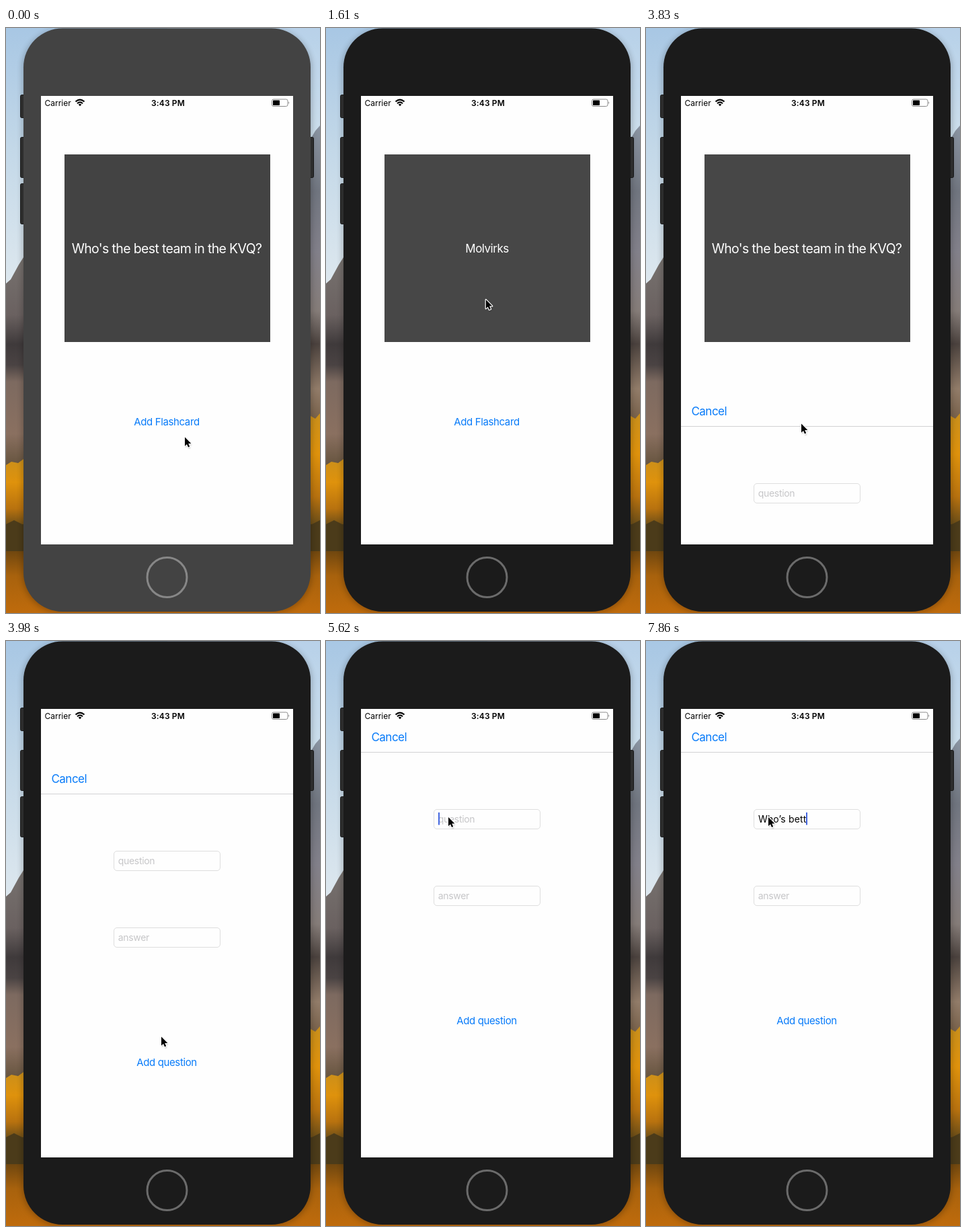
Recreate the animation shown at these times as an HTML page. Size 467x870 px, loop 8 s.

```html
<!DOCTYPE html>
<html lang="en">
<head>
<meta charset="utf-8">
<title>Flashcards</title>
<style>
  html, body { margin: 0; width: 100%; height: 100%; overflow: hidden; background: #fefefe; }
  svg { display: block; width: 100%; height: 100%; }
  text { font-family: Inter, "Liberation Sans", sans-serif; white-space: pre; }
  .mid { text-anchor: middle; }
  .status { font-size: 12px; }
  .card { fill: #fefefe; font-size: 17px; letter-spacing: -.5px; }
  .prompt { font-size: 19.5px; letter-spacing: -.64px; }
  .link { fill: #087bf9; font-size: 15px; letter-spacing: -.37px; }
  .nav { font-size: 17px; letter-spacing: -.5px; }
  .hint { fill: #c6c6c8; font-size: 14px; letter-spacing: -.3px; }
  .typed { fill: #000; font-size: 14px; letter-spacing: .15px; }
  .field { fill: #fefefe; stroke: #dedede; }
</style>
</head>
<body>
<svg viewBox="0 0 467 870">
  <defs>
    <linearGradient id="sky" x2="0" y2="1">
      <stop stop-color="#a8c7e4"/><stop offset=".45" stop-color="#c3d8e8"/><stop offset="1" stop-color="#e0e9ef"/>
    </linearGradient>
    <linearGradient id="leftRock" gradientUnits="userSpaceOnUse" x1="0" y1="340" x2="0" y2="650">
      <stop stop-color="#77726f"/><stop offset=".28" stop-color="#6a6160"/><stop offset=".42" stop-color="#3f3a3b"/>
      <stop offset=".52" stop-color="#4a4343"/><stop offset=".6" stop-color="#7d6a60"/><stop offset=".85" stop-color="#8a7060"/>
      <stop offset="1" stop-color="#66543f"/>
    </linearGradient>
    <linearGradient id="rightRock" gradientUnits="userSpaceOnUse" x1="0" y1="145" x2="0" y2="590">
      <stop stop-color="#8a94a2"/><stop offset=".22" stop-color="#70757f"/><stop offset=".42" stop-color="#82808a"/>
      <stop offset=".62" stop-color="#857c78"/><stop offset=".73" stop-color="#4b423e"/><stop offset=".88" stop-color="#927c69"/>
      <stop offset="1" stop-color="#735c44"/>
    </linearGradient>
    <linearGradient id="trees" x2="0" y2="1">
      <stop stop-color="#c98f1c"/><stop offset=".35" stop-color="#df920c"/><stop offset=".72" stop-color="#b8720f"/>
      <stop offset="1" stop-color="#5d471a"/>
    </linearGradient>
    <linearGradient id="lake" x2="0" y2="1">
      <stop stop-color="#70470f"/><stop offset=".4" stop-color="#a8620d"/><stop offset="1" stop-color="#bf6b0c"/>
    </linearGradient>
    <filter id="soft" x="-20%" y="-20%" width="140%" height="140%"><feGaussianBlur stdDeviation="4"/></filter>
    <filter id="blur" x="-50%" y="-50%" width="200%" height="200%"><feGaussianBlur stdDeviation=".8"/></filter>
    <clipPath id="view"><rect x="52" y="101" width="375" height="667"/></clipPath>
    <path id="arrow" d="M0 0V13.2L3 10.4L5 15L7.2 14.1L5.2 9.6H9.4Z"/>
  </defs>

  <!-- wallpaper -->
  <rect width="467" height="400" fill="url(#sky)"/>
  <rect x="240" width="227" height="400" fill="#fff" opacity=".18"/>
  <path d="M0 380L7 374L13 363L19 352L26 341L60 300V680H0Z" fill="url(#leftRock)"/>
  <path d="M420 190L453 165L460 153L467 145V600H420Z" fill="url(#rightRock)"/>
  <path d="M0 650L8 645L18 647L30 638V745H0Z" fill="url(#trees)"/>
  <path d="M440 588L453 577L460 581L467 573V745H440Z" fill="url(#trees)"/>
  <path d="M0 738L12 732L24 738H455L467 732V782H0Z" fill="#4b3b1a"/>
  <rect y="778" width="467" height="92" fill="url(#lake)"/>
  <rect x="24" y="2" width="431" height="868" rx="58" fill="#000" opacity=".22" filter="url(#soft)"/>

  <!-- phone -->
  <g fill="#2d2d2d" stroke="#171717">
    <rect x="21.5" y="99.5" width="9" height="34" rx="2"/>
    <rect x="21.5" y="162.5" width="9" height="60" rx="2"/>
    <rect x="21.5" y="231.5" width="9" height="60" rx="2"/>
    <rect x="448.5" y="162.5" width="9" height="60" rx="2"/>
  </g>
  <rect id="body" x="26" y="0.5" width="427" height="867.5" rx="58"/>
  <circle id="home" cx="239.5" cy="817" r="29.5" fill="none" stroke-width="3"/>
  <rect x="52" y="101" width="375" height="667" fill="#fefefe"/>

  <g clip-path="url(#view)">
    <rect id="card" x="87" y="188" width="306" height="279"/>
    <text id="question" class="card prompt mid" x="239" y="335">Who's the best team in the KVQ?</text>
    <text id="answer" class="card mid" x="239.5" y="334">Molvirks</text>
    <text class="link mid" x="239" y="590.5">Add Flashcard</text>

    <g id="sheet">
      <rect x="52" y="101" width="375" height="667" fill="#fefefe"/>
      <text class="link nav" x="67.4" y="149">Cancel</text>
      <path d="M52 165.5H427" stroke="#d3d3d4"/>
      <rect class="field" x="160.5" y="250.5" width="158" height="29" rx="4.5"/>
      <rect class="field" x="160.5" y="364.5" width="158" height="29" rx="4.5"/>
      <text id="hint" class="hint" x="166.7" y="269.7">question</text>
      <text id="typed" class="typed" x="167" y="269.7"></text>
      <rect id="caret" y="255" width="2" height="18.5" fill="#4467e0"/>
      <text class="hint" x="166.7" y="383.7">answer</text>
      <text class="link mid" x="239" y="569.5">Add question</text>
    </g>
  </g>

  <!-- status bar -->
  <text class="status" x="57.5" y="115.7">Carrier</text>
  <text class="status mid" x="241" y="115.7" font-weight="600" letter-spacing=".15">3:43 PM</text>
  <g fill="none" stroke="#000" stroke-width="2.1">
    <path d="M103.5 109.6Q110 103.6 116.5 109.6"/>
    <path d="M106 112.2Q110 108.6 114 112.2"/>
    <path d="M107.7 113.7Q110 111.8 112.3 113.7L110 116.2Z" fill="#000" stroke="none"/>
  </g>
  <rect x="395.5" y="106" width="23.5" height="10.5" rx="2.5" fill="none" stroke="#8b8b8b"/>
  <rect x="397" y="107.5" width="10" height="7.5" rx=".8"/>
  <path d="M420.2 109.5Q422.4 111.2 420.2 113Z" fill="#8b8b8b"/>

  <g id="cursor">
    <use href="#arrow" x=".8" y="1.8" opacity=".4" filter="url(#blur)"/>
    <use href="#arrow" stroke="#fff" stroke-width="2.4" stroke-linejoin="round"/>
    <use href="#arrow"/>
  </g>
</svg>
<script>
const LOOP = 8000, FLIP = 1610, FLIP_BACK = 2660, OPEN = 3830, FOCUS = 5620;
const $ = id => document.getElementById(id);

// time, x, y of the pointer tip
const moves = [
  [0, 266, 608.5], [150, 261, 594.5], [900, 224.5, 470], [1050, 237.8, 404],
  [2810, 239, 420], [2955, 241, 470], [3100, 241, 530], [3250, 238, 576],
  [3395, 235, 597.5], [3545, 232, 594], [3690, 231, 588.5],
  [4280, 225, 520], [4430, 204, 380], [4570, 186, 288], [4720, 182, 262]
];
// time, text in the field, caret x
const typing = [
  [0, "", 167], [6060, "Wh", 188.5], [6360, "Who", 198], [6960, "Who’s", 208.5],
  [7110, "Who’s ", 212], [7410, "Who’s b", 220.5], [7560, "Who’s be", 228.5],
  [7710, "Who’s bet", 233.5], [7860, "Who’s bett", 238]
];

const latest = (list, t) => list.filter(row => row[0] <= t).pop();
const show = (id, on) => $(id).setAttribute("visibility", on ? "inherit" : "hidden");

function draw(t) {
  const dark = t >= FLIP, flipped = dark && t < FLIP_BACK, open = t >= OPEN;
  $("body").setAttribute("fill", dark ? "#1b1b1b" : "#434343");
  $("home").setAttribute("stroke", dark ? "#6b6b6b" : "#878787");
  $("card").setAttribute("fill", dark ? "#474747" : "#434343");
  show("question", !flipped);
  show("answer", flipped);

  // the sheet settles in discrete steps
  const step = Math.floor((t - OPEN) / 150);
  const drop = open ? Math.round(427 * Math.pow(0.145, step)) : 667;
  $("sheet").setAttribute("transform", `translate(0 ${drop})`);
  show("sheet", open);

  const [, text, caretX] = latest(typing, t);
  $("typed").textContent = text;
  $("caret").setAttribute("x", caretX);
  show("hint", !text);
  show("caret", t >= FOCUS);

  const [, x, y] = latest(moves, t);
  $("cursor").setAttribute("transform", `translate(${x} ${y})`);
}

const start = performance.now();
function tick() {
  draw((performance.now() - start) % LOOP);
  requestAnimationFrame(tick);
}
tick();
</script>
</body>
</html>
```
